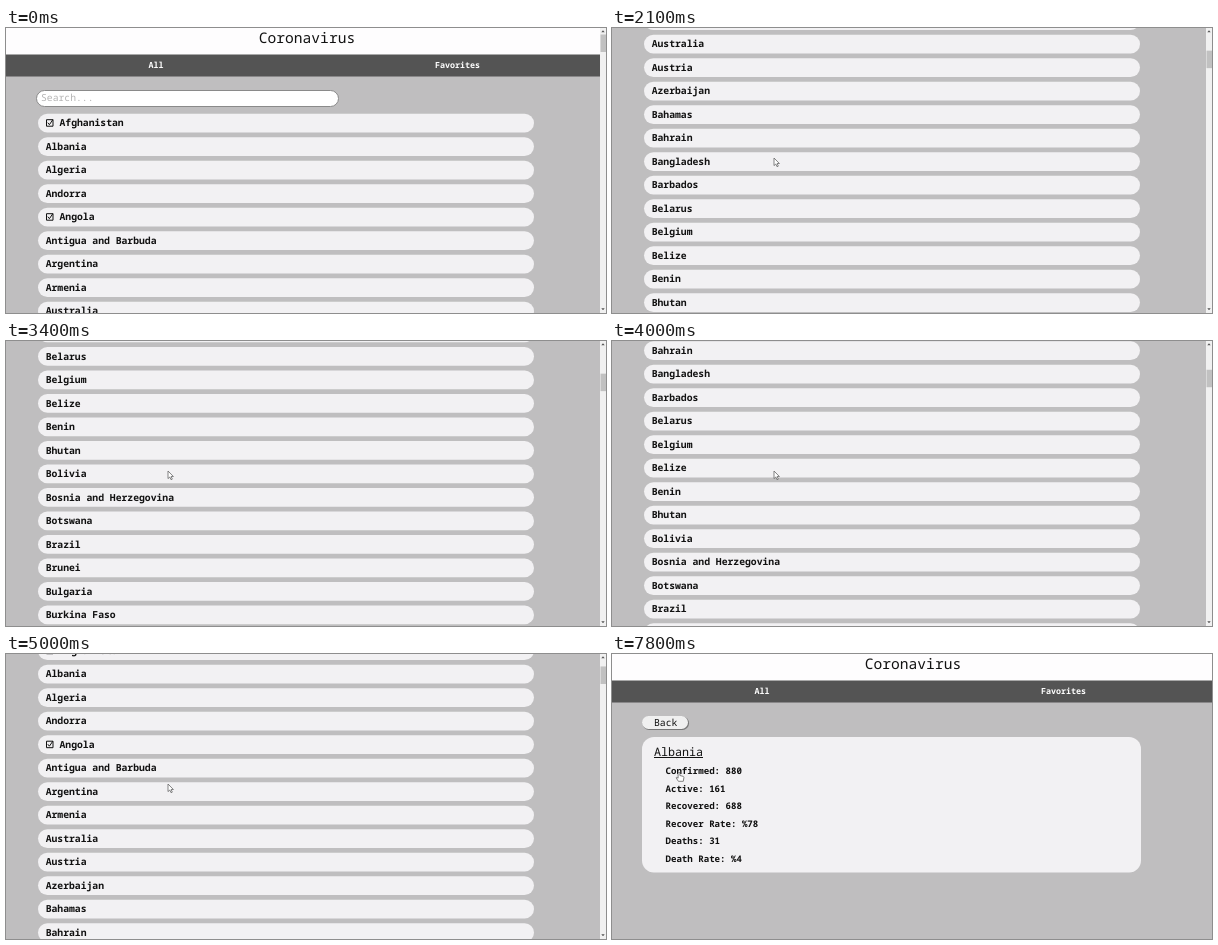
An HTML page that plays this animation: 600 by 285 pixels, repeating every 8 s.

```html
<!DOCTYPE html>
<html lang="en">
<head>
<meta charset="utf-8">
<title>Coronavirus</title>
<style>
  html, body { margin: 0; width: 100%; height: 100%; overflow: hidden; background: #bfbebf; }
  svg { display: block; width: 600px; height: 285px; }
  text { font: 600 9.72px "Noto Sans Mono", "DejaVu Sans Mono", monospace; fill: #111; text-rendering: geometricPrecision; white-space: pre; }
  .title { font-size: 14.6px; font-weight: 500; text-anchor: middle; }
  .nav { font-size: 8.4px; fill: #fff; text-anchor: middle; }
  .hint { font-weight: 400; fill: #b4b4b4; }
  .plain { font-weight: 400; }
  .heading { font-size: 11.7px; font-weight: 500; }
  .stat { font-size: 9.1px; }
  .card { fill: #f2f1f3; }
  .hover { fill: #e9e8ea; stroke: #999; stroke-width: .8; }
  .tick { fill: none; stroke: #111; }
  .pointer { fill: #fff; stroke: #666; stroke-width: .8; stroke-linejoin: round; }
</style>
</head>
<body>
<svg id="stage" viewBox="0 0 600 285">
  <rect width="600" height="285" fill="#bfbebf"/>
  <g id="page">
    <rect width="600" height="27" fill="#fefdfe"/>
    <rect y="26.5" width="600" height="22" fill="#545454"/>
    <text class="title" x="301" y="14.5">Coronavirus</text>
    <text class="nav" x="150" y="40.3">All</text>
    <text class="nav" x="451.5" y="40.3">Favorites</text>
    <g id="list">
      <rect x="30.5" y="62.5" width="302" height="16" rx="8" fill="#fff" stroke="#8a8a8a"/>
      <text class="hint" x="35" y="73">Search...</text>
    </g>
    <g id="details">
      <rect x="30.5" y="62.5" width="46.5" height="13.5" rx="6.7" fill="#777"/>
      <rect x="30" y="62" width="46" height="13" rx="6.5" fill="#f0f0f0"/>
      <text class="plain" x="42" y="71.8">Back</text>
      <rect class="card" x="30" y="83" width="499" height="135.5" rx="12"/>
      <text class="heading" x="42" y="101.5">Albania</text>
      <path d="M42 103.5h49" stroke="#111"/>
    </g>
  </g>
  <g id="scrollbar">
    <rect x="594" width="6" height="285" fill="#f1f1f1"/>
    <path d="M595.3 4.2l1.7-2 1.7 2zM595.3 280.3l1.7 2 1.7-2z" fill="#555"/>
    <rect id="thumb" x="594.5" width="5.5" height="17.5" fill="#c1c1c1"/>
  </g>
  <g id="cursor">
    <path id="arrow" class="pointer" d="M0 0v7.6l1.8-1.6 1.2 2.7 1.3-.6-1.2-2.6h2.3z"/>
    <path id="hand" class="pointer" d="M-.9 5V.8Q0-.6.9.8V3.5l3.4.9q.7.3.6 1.2L4.3 9.3H-.6L-2.9 5.8q.4-1.2 2 .4z"/>
  </g>
</svg>
<script>
const LOOP = 8000, STEP = 100, OPEN_AT = 7800;
const ROW_TOP = 85.7, ROW_PITCH = 23.5, ROW_HEIGHT = 18.8;
const countries = ["Afghanistan", "Albania", "Algeria", "Andorra", "Angola",
  "Antigua and Barbuda", "Argentina", "Armenia", "Australia", "Austria", "Azerbaijan",
  "Bahamas", "Bahrain", "Bangladesh", "Barbados", "Belarus", "Belgium", "Belize", "Benin",
  "Bhutan", "Bolivia", "Bosnia and Herzegovina", "Botswana", "Brazil", "Brunei", "Bulgaria",
  "Burkina Faso", "Burundi", "Cabo Verde", "Cambodia", "Cameroon"];
const favorites = ["Afghanistan", "Angola"];
const stats = ["Confirmed: 880", "Active: 161", "Recovered: 688", "Recover Rate: %78",
  "Deaths: 31", "Death Rate: %4"];

// Keyframes: [time, ...values]
const scrollKeys = [[1300, 0], [1400, 10], [1500, 44], [2000, 255], [2100, 267], [2200, 267],
  [2900, 356], [3100, 400], [3150, 400], [3500, 445], [3600, 445], [4000, 367.5],
  [4500, 222], [4550, 222], [5000, 98.5], [5400, 0]];
const cursorKeys = [[300, 1, 12], [800, 162, 130], [5950, 162, 130], [6600, 100, 124],
  [6750, 100, 124], [7300, 67, 118]];

const $ = id => document.getElementById(id);

function add(parent, tag, attributes, content = "") {
  const node = document.createElementNS("http://www.w3.org/2000/svg", tag);
  for (const name in attributes) node.setAttribute(name, attributes[name]);
  node.textContent = content;
  return parent.appendChild(node);
}

function sample(keys, time) {
  const next = keys.findIndex(key => key[0] > time);
  if (next === 0) return keys[0].slice(1);
  if (next < 0) return keys[keys.length - 1].slice(1);
  const from = keys[next - 1], to = keys[next];
  const part = (time - from[0]) / (to[0] - from[0]);
  return from.slice(1).map((value, i) => value + (to[i + 1] - value) * part);
}

const rows = countries.map((name, i) => {
  const y = ROW_TOP + i * ROW_PITCH;
  const row = add($("list"), "rect",
    { class: "card", x: 32, y, width: 496, height: ROW_HEIGHT, rx: ROW_HEIGHT / 2 });
  const favorite = favorites.includes(name);
  if (favorite) add($("list"), "path", { class: "tick", d: `M40.5 ${y + 6}h6.5v6.5h-6.5zM41.8 ${y + 9}l1.6 2 3.4-5` });
  add($("list"), "text", { x: favorite ? 53.5 : 39.7, y: y + 12.6 }, name);
  return row;
});
stats.forEach((line, i) =>
  add($("details"), "text", { class: "stat", x: 53.5, y: 120.2 + i * 17.5 }, line));

const show = (id, visible) => $(id).style.display = visible ? "" : "none";
const move = (id, x, y) => $(id).setAttribute("transform", `translate(${x} ${y})`);

function draw(now) {
  const time = Math.floor(now % LOOP / STEP) * STEP;
  const [scroll] = sample(scrollKeys, time);
  const [x, y] = sample(cursorKeys, time);
  const opened = time >= OPEN_AT;

  move("page", 0, -scroll);
  $("thumb").setAttribute("y", 6.5 + scroll * .0605);
  show("list", !opened);
  show("scrollbar", !opened);
  show("details", opened);

  const canHover = time >= 300 && (time < 1300 || time > 5400);
  let hovering = false;
  rows.forEach((row, i) => {
    const top = ROW_TOP + i * ROW_PITCH;
    const over = canHover && x > 32 && x < 528 && y > top && y < top + ROW_HEIGHT;
    row.setAttribute("class", over ? "card hover" : "card");
    hovering ||= over;
  });
  move("cursor", x, y);
  show("cursor", time >= 300);
  show("hand", hovering);
  show("arrow", !hovering);
}

const start = performance.now();
function tick() {
  draw(performance.now() - start);
  requestAnimationFrame(tick);
}
tick();
</script>
</body>
</html>
```
